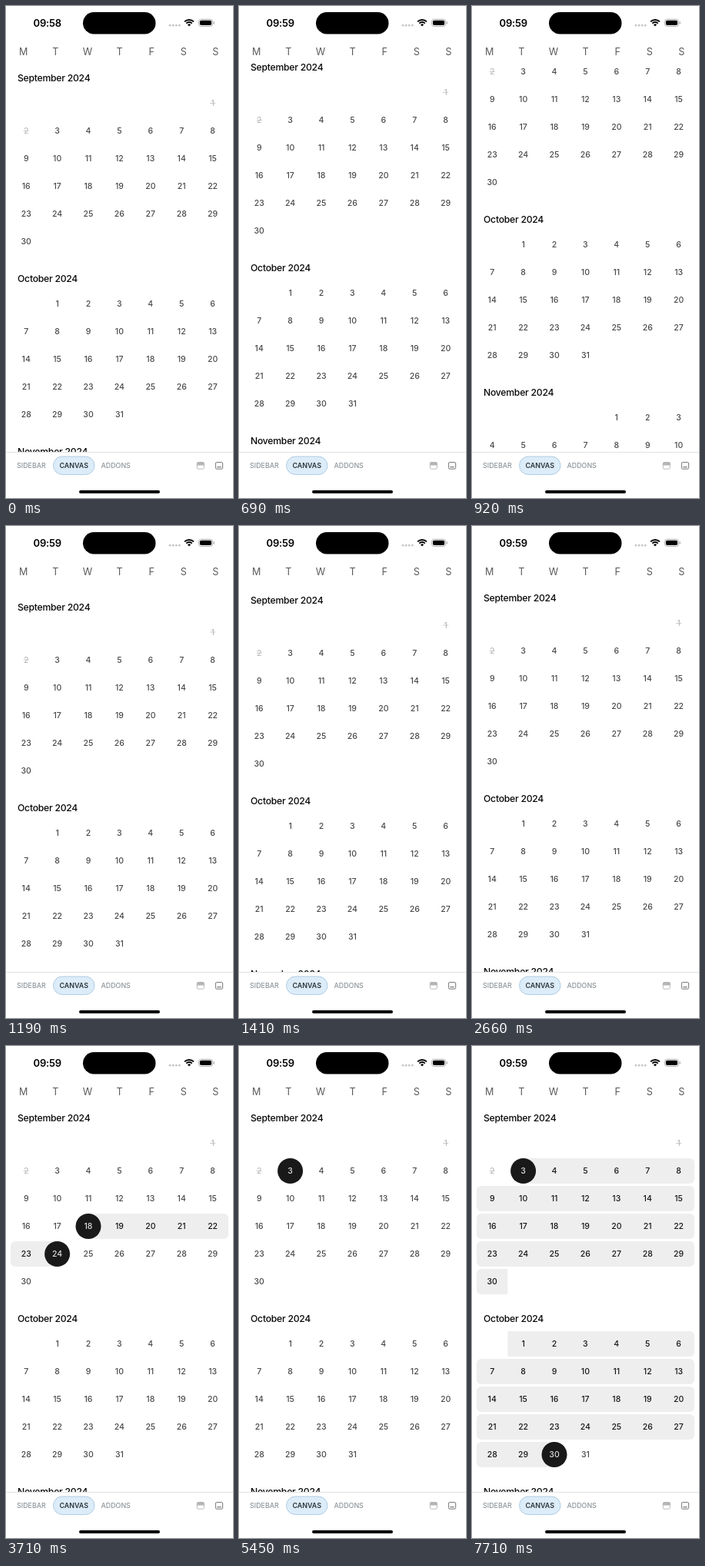
Animation, 295 px wide and 640 px high, one loop 8000 ms. Source, as an HTML page with a canvas:

```html
<!DOCTYPE html>
<html lang="en">
<head>
<meta charset="utf-8">
<title>Calendar range picker</title>
<style>
html, body { margin: 0; width: 100%; height: 100%; overflow: hidden; background: #fff; }
canvas { display: block; width: 295px; height: 640px; }
</style>
</head>
<body>
<canvas id="stage"></canvas>
<script>
(() => {
const W = 295, H = 640, LOOP = 8000;
const FONT = 'Inter, "Liberation Sans", sans-serif';
const canvas = document.getElementById('stage');
const ctx = canvas.getContext('2d');
const dpr = window.devicePixelRatio || 1;
canvas.width = W * dpr;
canvas.height = H * dpr;

const ROW = 36, BAND = 33, LEFT = 6, RIGHT = 289;
const VIEW_TOP = 74, VIEW_BOTTOM = 580;
const colX = c => 26.2 + c * 40.4;

// first: weekday column of day 1, Monday = 0
const months = [
  { name: 'September 2024', first: 6, days: 30 },
  { name: 'October 2024', first: 1, days: 31 },
  { name: 'November 2024', first: 4, days: 30 }
];
let nextY = 94, count = 0;
for (const m of months) {
  m.y = nextY;
  m.start = count;
  m.rows = Math.ceil((m.first + m.days) / 7);
  nextY += m.rows * ROW + 45;
  count += m.days;
}

// Selected ranges in days counted from 1 September
const ranges = [
  { at: 3710, from: 18, to: 24 },
  { at: 5450, from: 3, to: 3 },
  { at: 7710, from: 3, to: 60 }
];

// Drag up, flick back past the top, then settle
const drag = [[0, 0], [690, -14], [800, -50], [920, -77], [1040, 24]];
const settleTimes = [1190, 1290, 1390, 1500, 1610];

function last(list, t, time) {
  let hit = null;
  for (const item of list) if (time(item) <= t) hit = item;
  return hit;
}

function scrollAt(t) {
  if (t >= 2660) return 0;
  const s = last(settleTimes, t, v => v);
  if (s !== null) return 11.5 * Math.exp(-(s - 1190) / 134);
  return last(drag, t, d => d[0])[1];
}

function text(str, x, y, size, weight, color, align = 'center', spacing = 0) {
  ctx.font = `${weight} ${size}px ${FONT}`;
  ctx.letterSpacing = spacing + 'px';
  ctx.textAlign = align;
  ctx.fillStyle = color;
  ctx.fillText(str, x, y + size * 0.364);
}

function box(x, y, w, h, r, fill, stroke, line = 1) {
  ctx.beginPath();
  ctx.roundRect(x, y, w, h, r);
  if (fill) { ctx.fillStyle = fill; ctx.fill(); }
  if (stroke) { ctx.strokeStyle = stroke; ctx.lineWidth = line; ctx.stroke(); }
}

function disc(x, y, r, fill) {
  ctx.beginPath();
  ctx.arc(x, y, r, 0, Math.PI * 2);
  ctx.fillStyle = fill;
  ctx.fill();
}

function drawBands(m, range) {
  const a = Math.max(range.from - m.start, 1);
  const b = Math.min(range.to - m.start, m.days);
  if (a > b || range.from === range.to) return;
  for (let r = 0; r < m.rows; r++) {
    const lo = Math.max(a, r * 7 - m.first + 1);
    const hi = Math.min(b, r * 7 - m.first + 7);
    if (lo > hi) continue;
    const c0 = lo + m.first - 1 - r * 7, c1 = hi + m.first - 1 - r * 7;
    let x0 = c0 ? colX(c0) - 20.2 : LEFT;
    let x1 = c1 < 6 ? colX(c1) + 20.2 : RIGHT;
    if (lo + m.start === range.from) x0 = colX(c0);
    if (hi + m.start === range.to) x1 = colX(c1);
    const l = c0 ? 0 : 6, e = c1 < 6 ? 0 : 6;
    box(x0, m.y + 32.5 + r * ROW - BAND / 2, x1 - x0, BAND, [l, e, e, l], '#eeeeee');
  }
}

function drawMonth(m, range) {
  text(m.name, 15, m.y, 12.2, 500, '#080808', 'left', -0.25);
  if (range) drawBands(m, range);
  for (let d = 1; d <= m.days; d++) {
    const cell = d + m.first - 1, n = d + m.start;
    const x = colX(cell % 7), y = m.y + 32.5 + Math.floor(cell / 7) * ROW;
    let color = '#484848';
    if (range && n >= range.from && n <= range.to) {
      color = '#151515';
      if (n === range.from || n === range.to) {
        disc(x, y, BAND / 2, '#191919');
        color = '#dedede';
      }
    }
    if (n < 3) {
      color = '#bcbcbc';
      ctx.fillStyle = color;
      ctx.fillRect(x - 3.5, y - 0.4, 7, 0.8);
    }
    text(d, x, y, 10.5, 500, color);
  }
}

function drawStatus(t) {
  text(t < 500 ? '09:58' : '09:59', 35.5, 22, 13, 600, '#000', 'left', -0.2);
  box(100, 8, 94.5, 28.5, 14.25, '#000');
  for (let i = 0; i < 4; i++) disc(213 + i * 4.1, 25.2, 1.35, '#c4c4c4');

  // Wi-Fi
  ctx.strokeStyle = '#000';
  ctx.lineWidth = 2;
  for (const r of [8.4, 5.2]) {
    ctx.beginPath();
    ctx.arc(238, 26.3, r, -Math.PI * 0.75, -Math.PI * 0.25);
    ctx.stroke();
  }
  ctx.beginPath();
  ctx.moveTo(238, 26.6);
  ctx.arc(238, 26.3, 2.9, -Math.PI * 0.75, -Math.PI * 0.25);
  ctx.fillStyle = '#000';
  ctx.fill();

  // Battery
  box(250.5, 17.3, 18, 9.2, 3, null, '#a6a6a6', 0.9);
  box(251.9, 18.7, 15.2, 6.4, 1.8, '#000');
  box(269.6, 20.3, 1.2, 3.2, 0.6, '#a6a6a6');
}

function drawToolbar() {
  ctx.fillStyle = '#fff';
  ctx.fillRect(0, VIEW_BOTTOM, W, H - VIEW_BOTTOM);
  ctx.fillStyle = '#dfe2e5';
  ctx.fillRect(0, VIEW_BOTTOM, W, 1);
  box(61.5, 586, 53.5, 23.5, 11.75, '#dcecf9', '#aac8df', 0.9);
  text('SIDEBAR', 14, 598, 8.9, 500, '#8d959b', 'left');
  text('CANVAS', 69.5, 598, 8.9, 600, '#2e3438', 'left');
  text('ADDONS', 123.5, 598, 8.9, 500, '#8d959b', 'left');

  box(248.3, 593.6, 9, 8.6, 1.5, null, '#b4b4b4', 0.9);
  box(248, 593.2, 9.6, 4.2, [1.5, 1.5, 0, 0], '#b4b4b4');
  box(272.4, 593.6, 9.2, 8.6, 1.5, null, '#666', 0.9);
  ctx.fillStyle = '#666';
  ctx.fillRect(274.3, 599.2, 5.4, 1.1);

  box(95, 630, 105, 4, 2, '#000');
}

function draw(t) {
  ctx.setTransform(dpr, 0, 0, dpr, 0, 0);
  ctx.fillStyle = '#fff';
  ctx.fillRect(0, 0, W, H);

  ctx.save();
  ctx.beginPath();
  ctx.rect(0, VIEW_TOP, W, VIEW_BOTTOM - VIEW_TOP);
  ctx.clip();
  ctx.translate(0, scrollAt(t));
  const range = last(ranges, t, r => r.at);
  for (const m of months) drawMonth(m, range);
  ctx.restore();

  [...'MTWTFSS'].forEach((d, i) =>
    text(d, 22.7 + i * 41.6, 59.5, 12.6, 400, '#5a5a5a'));
  drawStatus(t);
  drawToolbar();
}

const begin = performance.now();
function tick() {
  draw((performance.now() - begin) % LOOP);
  requestAnimationFrame(tick);
}
tick();
})();
</script>
</body>
</html>
```
